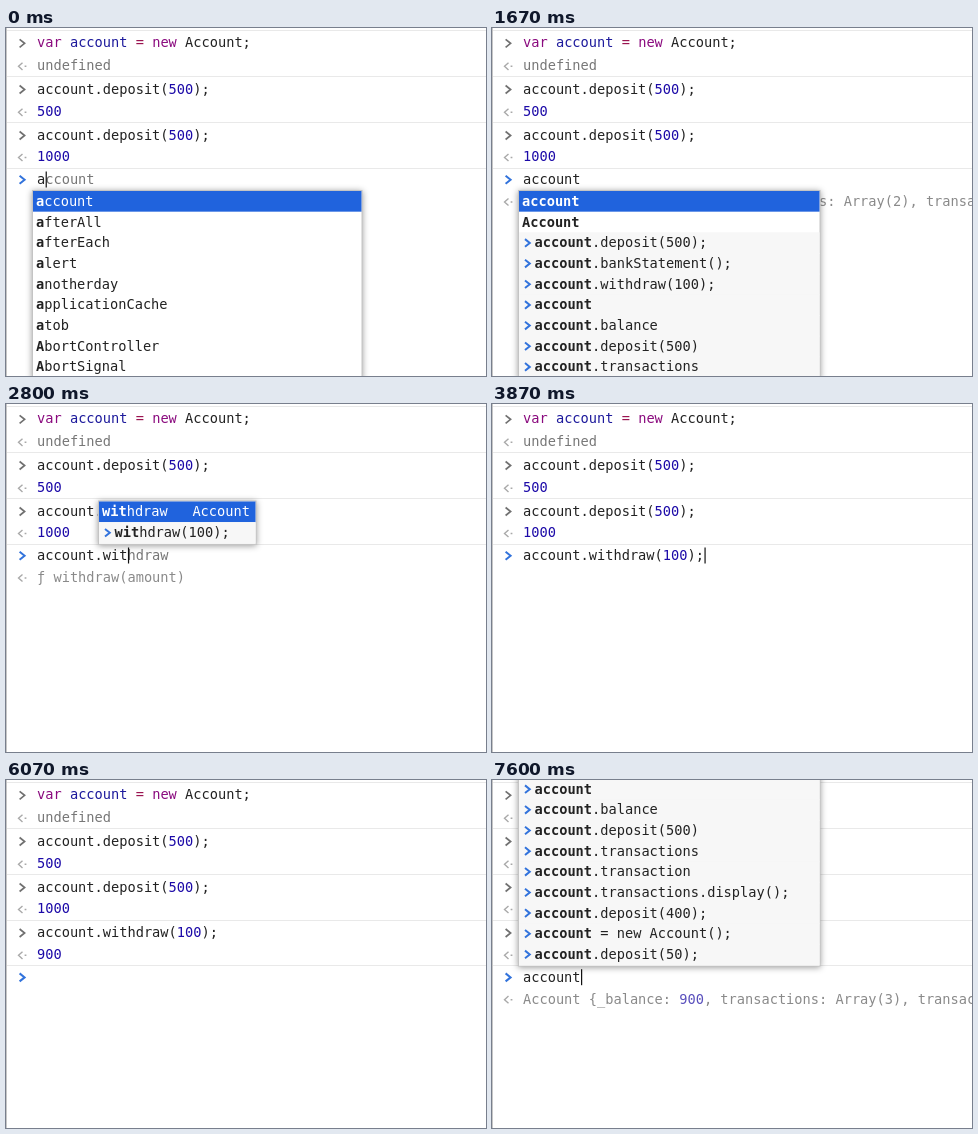
Recreate the animation shown at these times as an HTML page. Size 480x348 px, loop 8000 ms.

```html
<!DOCTYPE html>
<html lang="en">
<head>
<meta charset="utf-8">
<title>Console</title>
<style>
html, body { margin: 0; width: 100%; height: 100%; overflow: hidden; background: #fff; }
svg { display: block; width: 100%; height: 100%; }
text { font: 13.67px "DejaVu Sans Mono", monospace; white-space: pre; fill: #222; }
.bold { font-weight: bold; }
.kw { fill: #8a0a7e; }
.op { fill: #9a1450; }
.def { fill: #1d1a9c; }
.num { fill: #1c0aa8; }
.dim { fill: #777; }
.eager { fill: #8a8a8a; }
.eager .num { fill: #5a50bd; }
.label { fill: #8c8c8c; }
.sel { fill: #fff; }
.line { stroke: #e9e9e9; }
.mark { fill: none; stroke: #707070; stroke-width: 1.7; }
.faint { stroke: #a9a9a9; stroke-width: 1.4; }
.blue { stroke: #3273dc; stroke-width: 2; }
.popup { fill: #fff; stroke: #c4c4c4; filter: drop-shadow(0 1px 3px rgba(0, 0, 0, .4)); }
</style>
</head>
<body>
<svg id="stage" viewBox="0 0 480 348"></svg>
<script>
const stage = document.getElementById('stage');
const LOOP = 8000, CHAR = 8.23, ROW = 20.66, LEFT = 31;

const span = (cls, s) => `<tspan class="${cls}">${s}</tspan>`;
const text = (x, y, s, cls = '') => `<text x="${x}" y="${y}" class="${cls}">${s}</text>`;
const rect = (x, y, w, h, fill) => `<rect x="${x}" y="${y}" width="${w}" height="${h}" fill="${fill}"/>`;
const line = y => `<path class="line" d="M1 ${y}H480"/>`;
const chevron = (x, y, cls = '', r = 4) => `<path class="mark ${cls}" d="M${x} ${y - r}l${r * 1.25} ${r}l${-r * 1.25} ${r}"/>`;
const arrow = y => `<path class="mark faint" d="M16.5 ${y - 3.6}l-4 3.6l4 3.6M18.6 ${y}h1.8"/>`;

const input = (y, s) => chevron(13.6, y - 4) + text(LEFT, y, s);
const output = (y, s, cls) => arrow(y - 3.7) + text(LEFT, y, s, cls);
const call = (name, n) => `account.${name}(${span('num', n)});`;

const history =
  line(2.5) +
  input(19.3, `${span('kw', 'var')} ${span('def', 'account')} ${span('op', '=')} ${span('kw', 'new')} Account;`) +
  output(42, 'undefined', 'dim') + line(48.5) +
  input(65.5, call('deposit', 500)) + output(88, 500, 'num') + line(94.5) +
  input(111.5, call('deposit', 500)) + output(133.2, 1000, 'num') + line(140.5);
const withdrawal = input(157, call('withdraw', 100));
const result = output(179, 900, 'num') + line(185.5);

// Rows: ">" marks a history entry, "|" separates the right-hand label.
const menu = (rows, right = 328, opts = {}) => ({ rows: rows.split('\n'), right, left: 26.5, sel: 0, ...opts });
const menuA = menu('account\nafterAll\nafterEach\nalert\nanotherday\napplicationCache\natob\nAbortController\nAbortSignal', 356);
const menuAc = menu('account\nAccelerometer\nAccount\napplicationCache\nBackgroundFetchManager\nBackgroundFetchRecord\nCacheStorage\nDeviceMotionEventAcceleration\nHTMLFontFaceElement'.replace('\nHTMLFontFaceElement', '\nMIDIAccess'));
const menuAcc = menu('account\nAccelerometer\nAccount\nDeviceMotionEventAcceleration\nLinearAccelerationSensor\nMIDIAccess\nMediaKeySystemAccess\nMIDIAccess\nonaccept'.replace('\nMIDIAccess\nonaccept', ''));
const menuAcco = menu('account\nAccount\n>account.deposit(500);\n>account.bankStatement();\n>account.withdraw(100);\n>account\n>account.balance\n>account.deposit(500)\n>account.transactions');
const menuUp = menu('>account.withdraw(100);\n>account\n>account.balance\n>account.deposit(500)\n>account.transactions\n>account.transaction\n>account.transactions.display();\n>account.deposit(400);\n>account = new Account();\n>account.deposit(50);', 328, { up: true, sel: -1 });
const menuDot = menu('date\nstatement\ntransaction\ntransactions\n_balance\nbankStatement|Account\nconstructor\ndeposit\nwithdraw', 328, { left: 92.5 });
const upDot = { left: 92.5, up: true };
const menuW = menu('withdraw|Account\nhasOwnProperty|Object\n>withdraw(100);', 250, upDot);
const menuWi = menu('withdraw|Account\n>withdraw(100);', 250, upDot);
const menuPick = { ...menuWi, sel: 1 };

const preview = (n, k) => `Account {_balance: ${span('num', n)}, transactions: Array(${k}), transaction: Transaction`;
const P2 = preview(1000, 2), P3 = preview(900, 3);
const FN = 'ƒ withdraw(amount)', DATE = 'DateFormatter {}';

// time, typed text, whole suggestion, menu, eager result, cursor hidden
const steps = [
  [0, 'a', 'account', menuA],
  [130, 'ac', 'account', menuA],
  [200, 'ac', 'account', menuAc, P2],
  [330, 'acc', 'account', menuAcc, P2],
  [470, 'acco', 'account', menuAcco, P2],
  [930, 'accoun', 'account', menuAcco, P2],
  [1130, 'account', '', menuAcco, P2],
  [1670, 'account', '', menuAcco, P2, true],
  [2000, 'account.', '', null, P2],
  [2130, 'account.', 'account.date', menuDot, P2],
  [2200, 'account.', 'account.date', menuDot, DATE],
  [2330, 'account.w', 'account.withdraw', menuW, DATE],
  [2400, 'account.w', 'account.withdraw', menuW, FN],
  [2530, 'account.wi', 'account.withdraw', menuWi, FN],
  [2670, 'account.wit', 'account.withdraw', menuWi, FN],
  [2870, 'account.with', 'account.withdraw', menuWi, FN],
  [3330, 'account.with', 'account.withdraw', menuWi, FN, true],
  [3470, 'account.with', 'account.withdraw(100);', menuPick],
  [3870, 'account.withdraw(100);', ''],
  [4400, '', '', null, '', true],
  [4470, '', '', null, '', true],
  [4600, '', ''],
  [5070, '', '', null, '', true],
  [5530, '', ''],
  [6070, '', '', null, '', true],
  [6530, '', ''],
  [6600, 'a', 'account'],
  [6670, 'a', 'account', menuA],
  [6800, 'ac', 'account', menuA],
  [6870, 'ac', 'account', menuAc, P3],
  [7000, 'acc', 'account', menuAcc, P3],
  [7070, 'acco', 'account', menuUp, P3],
  [7270, 'accou', 'account', menuUp, P3],
  [7470, 'accoun', 'account', menuUp, P3],
  [7600, 'account', '', menuUp, P3]
];

function emphasize(s, query) {
  const i = query ? s.toLowerCase().indexOf(query) : -1;
  if (i < 0) return s;
  const end = i + query.length;
  return s.slice(0, i) + span('bold', s.slice(i, end)) + s.slice(end);
}

function drawMenu(m, base, query) {
  const h = m.rows.length * ROW, w = m.right - m.left;
  const top = m.up ? base - 17.2 - h : base + 7;
  let out = `<rect class="popup" x="${m.left}" y="${top - .5}" width="${w}" height="${h + 2}"/>`;
  m.rows.forEach((row, i) => {
    const y = top + i * ROW, sel = i === m.sel, old = row[0] === '>';
    const [name, label] = row.replace('>', '').split('|');
    const cls = sel ? 'sel' : '';
    if (sel || old) out += rect(m.left + .5, y, w - 1, ROW + (old && !sel ? 1 : 0), sel ? '#2063dd' : '#f7f7f7');
    if (old) out += chevron(m.left + 6.5, y + 10.6, sel ? 'sel' : 'blue', 3.8).replace('mark sel"', 'mark" style="stroke:#fff"');
    out += text(m.left + (old ? 16 : 3.5), y + 15, emphasize(name, query), cls);
    if (label) out += text(m.right - 6 - label.length * CHAR, y + 15, label, cls || 'label');
  });
  return out;
}

function draw([time, typed, whole, popup, eager, hidden]) {
  const done = time >= 4400, ready = time >= 4470;
  const base = ready ? 201.7 : done ? 179 : 156;
  let out = rect(0, 0, 480, 348, '#fff') + history;
  if (done) out += withdrawal;
  if (ready) out += result;
  out += chevron(13.6, base - 4.3, 'blue');
  const shown = typed.replace('(100)', `(${span('num', 100)})`);
  out += text(LEFT, base, shown + span('dim', whole.slice(typed.length)));
  if (eager) out += arrow(base + 18) + text(LEFT, base + 22.3, eager, 'eager');
  if (!hidden) out += rect(LEFT + typed.length * CHAR + .4, base - 12.5, 1.2, 16, '#111');
  if (popup) out += drawMenu(popup, base, typed.split('.').pop());
  return out + rect(0, 0, 1, 348, '#c6c6c6');
}

let current;
function frame(now) {
  const t = now % LOOP;
  const step = steps.findLast(s => s[0] <= t);
  if (step !== current) stage.innerHTML = draw(current = step);
  requestAnimationFrame(frame);
}
frame(0);
</script>
</body>
</html>
```
